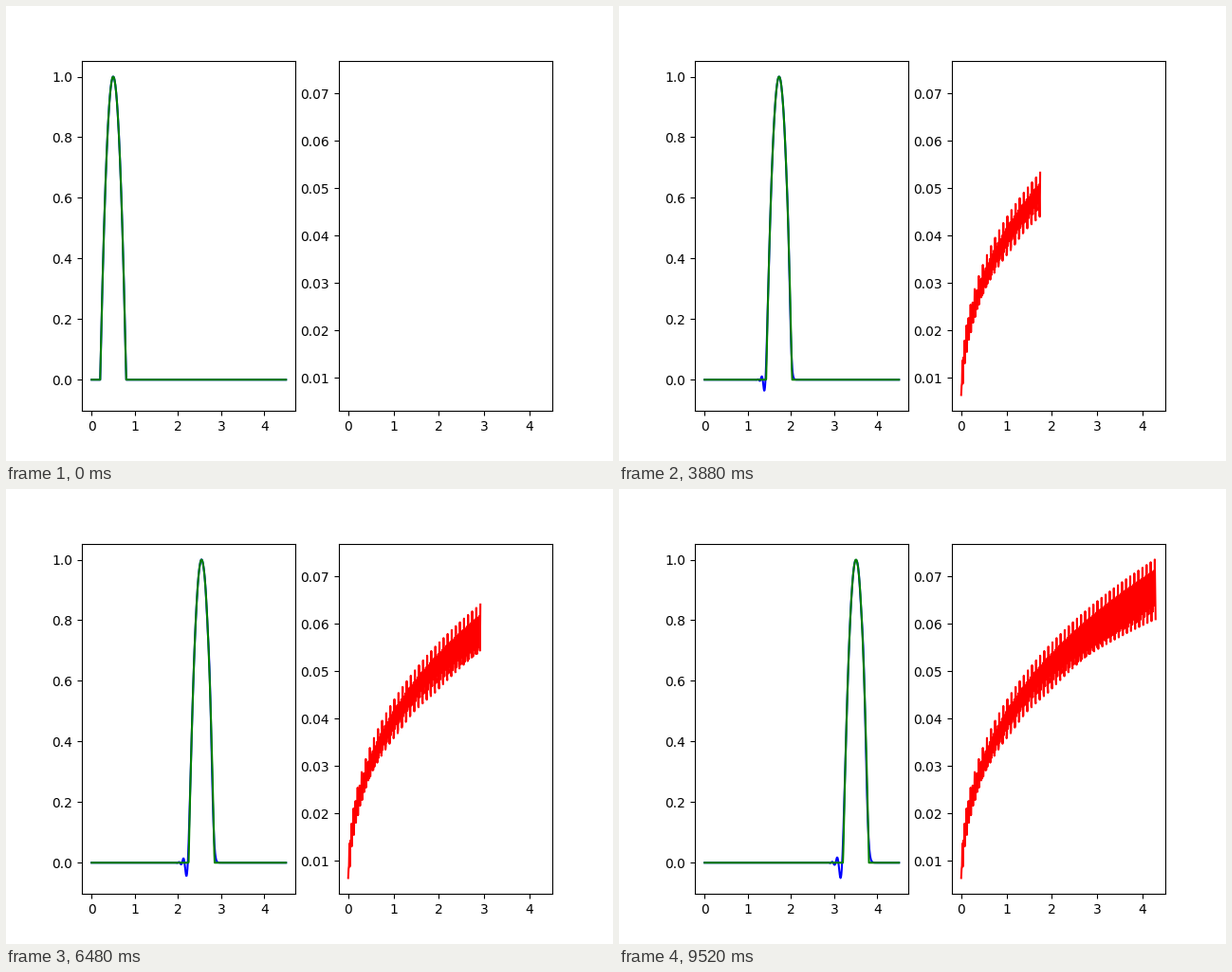
A matplotlib script for the animation above (9540 ms loop, 640 by 480 pixels).

```python
import matplotlib.pyplot as plt
import numpy as np
from matplotlib.animation import FuncAnimation

# Advection of a parabolic pulse with the Lax-Wendroff scheme
SPEED = 0.7
CFL = 0.7
STEPS = 476

x = np.linspace(0, 4.5, 500)
dx = x[1] - x[0]
dt = CFL * dx / SPEED


def pulse(s):
    return np.maximum(0, 1 - ((s - 0.5) / 0.3) ** 2)


def advance(u):
    new = u.copy()
    left, mid, right = u[:-2], u[1:-1], u[2:]
    new[1:-1] = (mid - CFL / 2 * (right - left)
                 + CFL ** 2 / 2 * (right - 2 * mid + left))
    return new


exact = [pulse(x - SPEED * n * dt) for n in range(STEPS + 1)]
approx = [pulse(x)]
for _ in range(STEPS):
    approx.append(advance(approx[-1]))

errors = np.array([np.abs(u - v).max() for u, v in zip(approx[1:], exact[1:])])
times = dt * np.arange(STEPS)


def padded(*data):
    low = min(np.min(d) for d in data)
    high = max(np.max(d) for d in data)
    pad = 0.05 * (high - low)
    return low - pad, high + pad


fig, (wave_ax, error_ax) = plt.subplots(1, 2, figsize=(6.4, 4.8), dpi=100)
wave_ax.set(xlim=padded(x), ylim=padded(approx, exact))
error_ax.set(xlim=padded(times), ylim=padded(errors))

approx_line, = wave_ax.plot([], [], color="blue")
exact_line, = wave_ax.plot([], [], color="green")
error_line, = error_ax.plot([], [], color="red")


def update(n):
    approx_line.set_data(x, approx[n])
    exact_line.set_data(x, exact[n])
    error_line.set_data(times[:n], errors[:n])
    return approx_line, exact_line, error_line


anim = FuncAnimation(fig, update, frames=STEPS + 1, interval=20,
                     repeat=True, repeat_delay=0, cache_frame_data=False)
plt.show()
```
